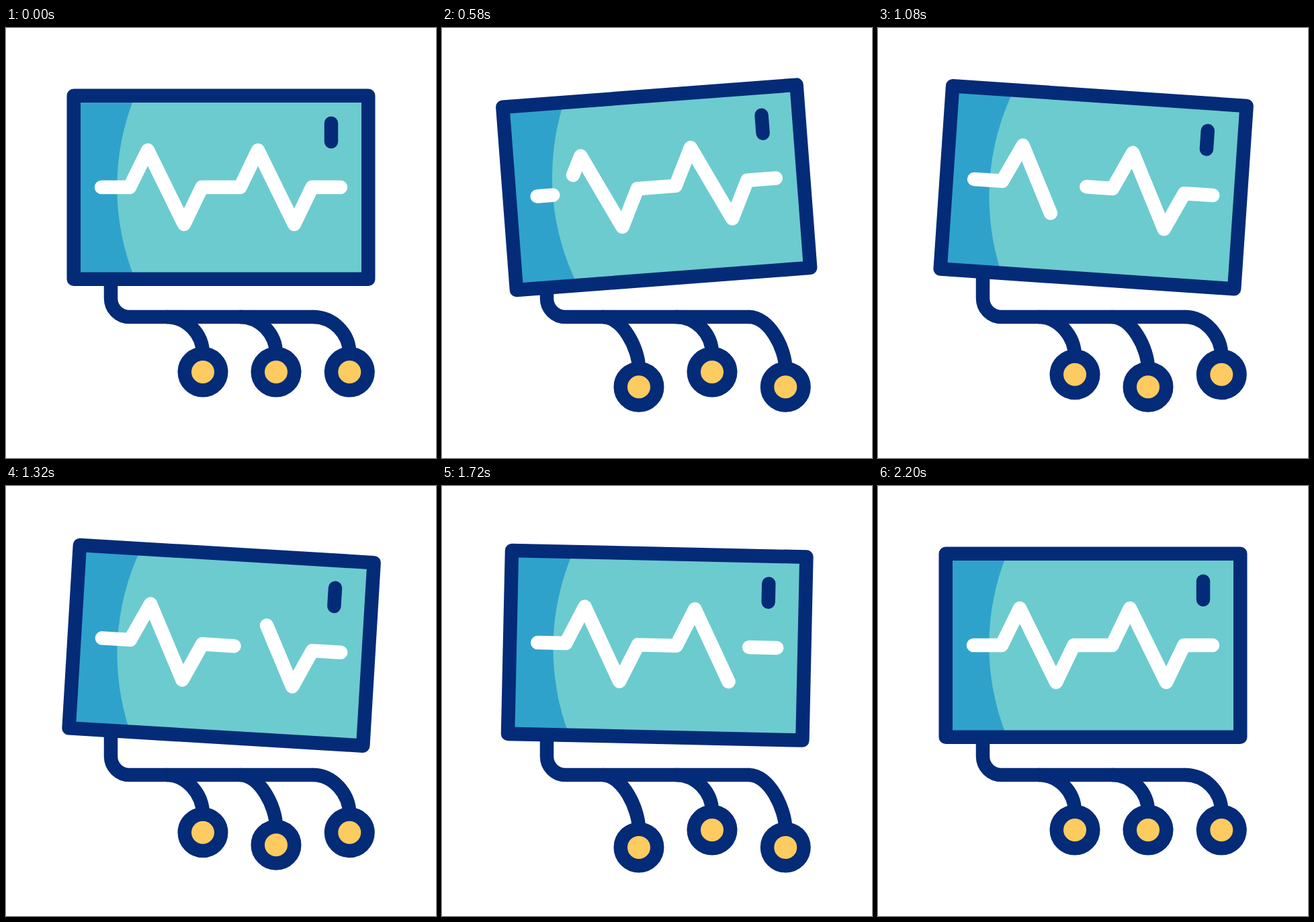
These frames come from a looping animation (640 px wide and 640 px high, 2.4 s). An HTML page:

```html
<!DOCTYPE html>
<html lang="en">
<head>
<meta charset="utf-8">
<title>Heart monitor</title>
<style>
  html, body { margin: 0; width: 100%; height: 100%; overflow: hidden; background: #fff; }
  svg { display: block; width: 100vw; height: 100vh; }
  .line { fill: none; stroke: #042b77; stroke-width: 20.5; stroke-linejoin: round; }
  .wave { fill: none; stroke: #fff; stroke-width: 20.5; stroke-linejoin: round; stroke-linecap: round; }
</style>
</head>
<body>
<svg viewBox="0 0 640 640">
  <path class="line" d="M156 362V402.5A27.5 27.5 0 0 0 183.5 430H458"/>
  <g id="leads"></g>
  <g id="monitor">
    <rect x="100.75" y="100.75" width="438.5" height="273" fill="#6ccbcf"/>
    <path d="M100.75 100.75H192A362 362 0 0 0 192 373.75H100.75Z" fill="#2fa2cc"/>
    <rect class="line" x="100.75" y="100.75" width="438.5" height="273"/>
    <path class="line" stroke-linecap="round" d="M484 141.75V169"/>
    <path class="wave" id="drawn"/>
    <path class="wave" id="old"/>
  </g>
</svg>
<script>
  const LOOP = 2400, STEP = 20;
  const LEAD_X = [293, 402, 511.3];
  const WAVE = 'M142 237H184L211 182L265 292L291.5 237H348.5L375 182L429 292L455.5 237H498';

  // Key times in ms with their values
  const TILT = [[200, 0], [790, -6.1], [1193, 6.25], [1530, -2.58], [1800, 2.29], [2200, 0]];
  const OUTER = [[200, 0], [700, 26], [1200, 0], [1700, 26], [2200, 0]];
  const INNER = [[700, 0], [1200, 26], [1700, 0]];
  const ERASE = [[200, 0], [2000, 1]];
  const DRAW = [[367, 0], [2200, 1]];

  const byId = id => document.getElementById(id);
  const ease = p => p * p * (3 - 2 * p);

  function valueAt(keys, t) {
    if (t <= keys[0][0]) return keys[0][1];
    for (let i = 1; i < keys.length; i++) {
      const [t0, a] = keys[i - 1], [t1, b] = keys[i];
      if (t < t1) return a + (b - a) * ease((t - t0) / (t1 - t0));
    }
    return keys[keys.length - 1][1];
  }

  function add(parent, tag, attrs) {
    const el = document.createElementNS('http://www.w3.org/2000/svg', tag);
    for (const name in attrs) el.setAttribute(name, attrs[name]);
    return parent.appendChild(el);
  }

  const leads = LEAD_X.map((x, i) => ({
    x,
    keys: i === 1 ? INNER : OUTER,
    cable: add(byId('leads'), 'path', { class: 'line' }),
    pad: add(byId('leads'), 'circle', { class: 'line', cx: x, r: 27.25, style: 'fill:#fdcb5f' })
  }));

  const monitor = byId('monitor'), drawn = byId('drawn'), old = byId('old');
  drawn.setAttribute('d', WAVE);
  old.setAttribute('d', WAVE);
  const total = drawn.getTotalLength();

  // Shows only the part of the wave between two fractions of its length
  function trim(path, from, to) {
    path.style.display = to > from ? '' : 'none';
    path.style.strokeDasharray = `${(to - from) * total + 0.01} ${total * 2}`;
    path.style.strokeDashoffset = -from * total;
  }

  function render(t) {
    monitor.setAttribute('transform', `rotate(${valueAt(TILT, t)} 320 247)`);
    for (const { x, keys, cable, pad } of leads) {
      const dy = valueAt(keys, t);
      cable.setAttribute('d',
        `M${x - 54.5} 430C${x - 24.5} 430 ${x} ${454.6 + dy} ${x} ${485 + dy}`);
      pad.setAttribute('cy', 512 + dy);
    }
    trim(drawn, 0, valueAt(DRAW, t));
    trim(old, valueAt(ERASE, t), 1);
  }

  const start = performance.now();
  function tick() {
    const t = (performance.now() - start) % LOOP;
    render(Math.floor(t / STEP) * STEP);
    requestAnimationFrame(tick);
  }
  tick();
</script>
</body>
</html>
```
